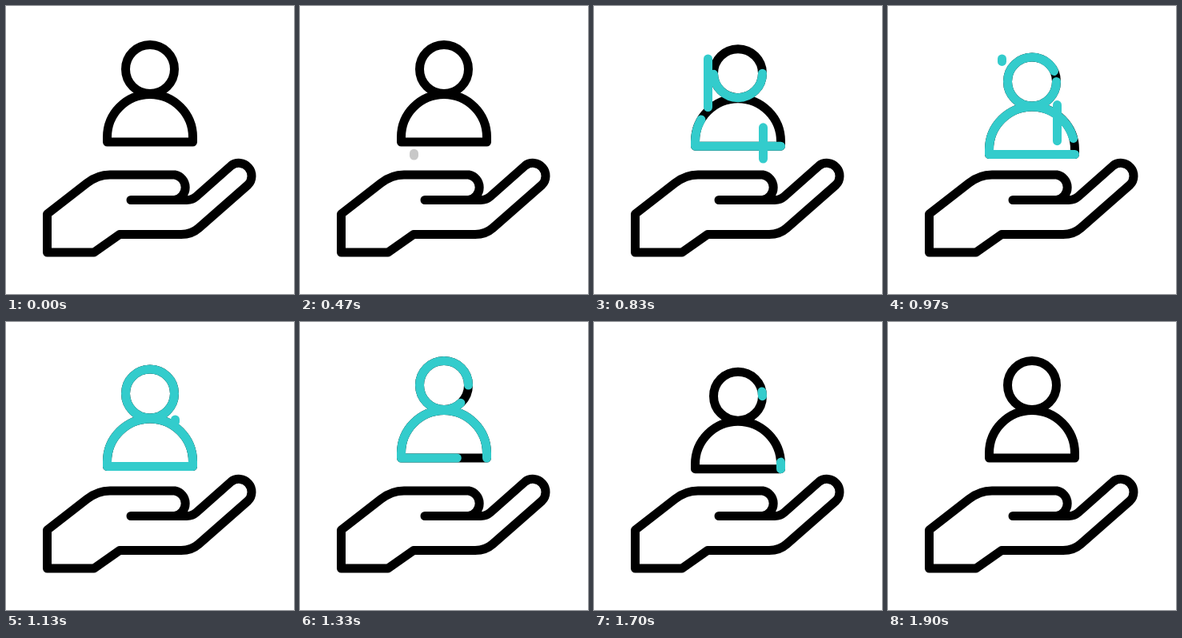
Recreate the animation shown at these times as an HTML page. Size 360 by 360 pixels, loop 2500 ms.

```html
<!DOCTYPE html>
<html lang="en">
<head>
<meta charset="utf-8">
<title>Care icon</title>
<style>
  html, body { margin: 0; width: 100%; height: 100%; overflow: hidden; background: #fff; }
  svg { display: block; width: 100%; height: 100%; }
  .ink, .glow { fill: none; stroke-width: 11; stroke-linecap: round; stroke-linejoin: round; }
  .ink { stroke: #000; }
  .glow { stroke: #33cccc; }
</style>
</head>
<body>
<svg viewBox="0 0 360 360">
  <defs>
    <path id="head" pathLength="1" d="M210.5 79A30.5 30.5 0 0 1 149.5 79A30.5 30.5 0 0 1 210.5 79"/>
    <path id="torso" pathLength="1" d="M233.5 170H126.5V164A53.5 53.5 0 0 1 233.5 164V170"/>
  </defs>
  <path class="ink" d="M156 242.5H226Q233 242.5 238 238L281.5 199.5A16 16 0 0 1 302.5 223.5L241 277.5Q232 285.5 219 285.5H142L110 308H51.5V260L101 221.5C110 214.5 119 211 130 211H211A16 16 0 0 1 211 242.5"/>
  <g id="person">
    <g class="ink"><use href="#head"/><use href="#torso"/></g>
    <g class="glow" id="trace"><use href="#head"/><use href="#torso"/></g>
  </g>
  <line class="glow" id="left" x1="142.5" x2="142.5"/>
  <line class="glow" id="right" x1="211.5" x2="211.5"/>
</svg>
<script>
  const LOOP = 2500, FPS = 30;
  const $ = id => document.getElementById(id);
  const person = $('person'), trace = $('trace'), left = $('left'), right = $('right');

  // Eased progress between two ticks
  const ease = (tick, from, to) => {
    const u = Math.min(1, Math.max(0, (tick - from) / (to - from)));
    return u * u * (3 - 2 * u);
  };

  // Vertical bob: [tick, offset]
  const BOB = [[22, 0], [30, 16.2], [40, 0], [49, 16.2], [57, 0]];
  const bob = tick => BOB.slice(1).reduce((y, [to, end], i) =>
    y + (end - BOB[i][1]) * ease(tick, BOB[i][0], to), 0);

  const show = (el, on) => { el.style.display = on ? '' : 'none'; };

  function rise(el, bottom, top, tip, tail) {
    show(el, tip - tail > 0.002);
    el.setAttribute('y1', bottom + (top - bottom) * tail);
    el.setAttribute('y2', bottom + (top - bottom) * tip);
  }

  function draw(tick) {
    person.setAttribute('transform', `translate(0 ${bob(tick)})`);

    const start = ease(tick, 36.3, 52.7), end = ease(tick, 19.2, 30.9);
    show(trace, end - start > 0.002);
    trace.style.strokeDasharray = `${end - start} 2`;
    trace.style.strokeDashoffset = -start;

    rise(left, 187, 66, ease(tick, 13, 24), ease(tick, 20, 30));
    left.style.stroke = tick < 15 ? '#c8c8c8' : '';
    rise(right, 191, 122, ease(tick, 19, 30), ease(tick, 25.2, 35.2));
  }

  const origin = performance.now();
  function loop() {
    const t = (performance.now() - origin) % LOOP;
    draw(Math.floor(t * FPS / 1000 + 0.101));
    requestAnimationFrame(loop);
  }
  loop();
</script>
</body>
</html>
```
